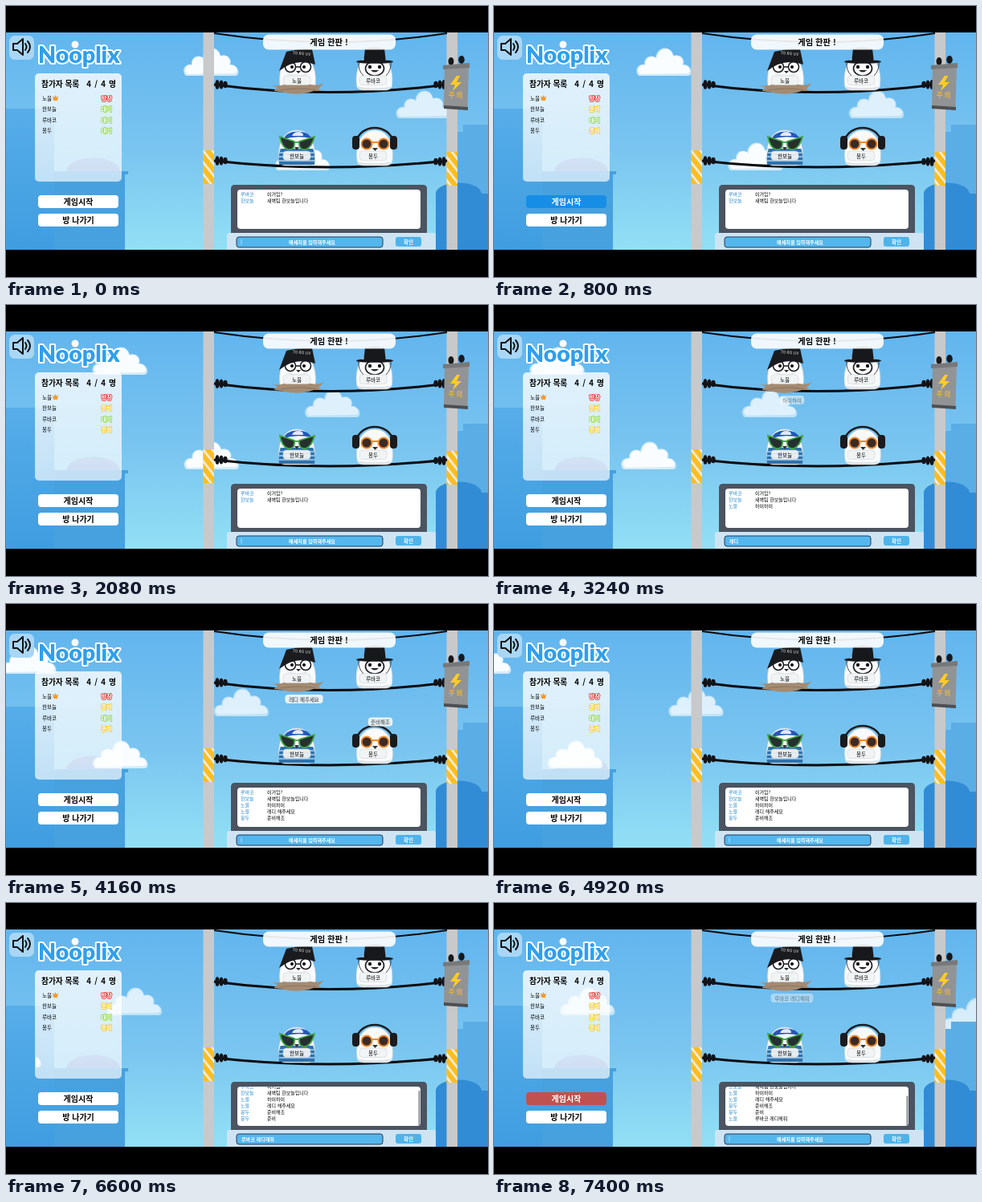
Write an HTML page that moves like this. It is 600 px wide and 338 px high and loops after 7440 ms.

```html
<!DOCTYPE html>
<html lang="ko">
<head>
<meta charset="utf-8">
<title>게임 대기실</title>
<style>
html, body { margin: 0; width: 100%; height: 100%; overflow: hidden; background: #000; }
svg { display: block; width: 100vw; height: 100vh; font-family: "Noto Sans CJK KR", "Noto Sans CJK", sans-serif; }
text { dominant-baseline: central; }
.mid { text-anchor: middle; }
.bold { font-weight: 700; }
.black { font-weight: 900; }
.logo { font: 900 28.5px Lato, sans-serif; fill: #2f9fec; stroke: #fff; stroke-width: 4; stroke-linejoin: round; paint-order: stroke; }
.status { font-size: 7.3px; font-weight: 700; fill: #fff; stroke-width: 1.5; stroke-linejoin: round; paint-order: stroke; }
.wire { fill: none; stroke: #0b0b0d; stroke-width: 3; }
.name { font-size: 6.5px; font-weight: 500; }
.chat { font-size: 6px; }
#clouds { animation: drift 7.44s linear infinite; }
@keyframes drift { to { transform: translateX(-405.5px); } }
</style>
</head>
<body>
<svg viewBox="0 0 600 338" preserveAspectRatio="none">
  <defs>
    <linearGradient id="sky" x2="0" y2="1">
      <stop offset="0" stop-color="#62b5ee"/>
      <stop offset=".55" stop-color="#7ac5f0"/>
      <stop offset="1" stop-color="#92e0f5"/>
    </linearGradient>
    <linearGradient id="tower" x2="0" y2="1">
      <stop offset="0" stop-color="#56ade9"/>
      <stop offset="1" stop-color="#3f9de0"/>
    </linearGradient>
    <linearGradient id="glass" x2="0" y2="1">
      <stop offset="0" stop-color="#fff" stop-opacity=".8"/>
      <stop offset="1" stop-color="#fff" stop-opacity=".66"/>
    </linearGradient>
    <pattern id="hazard" width="9" height="9" patternUnits="userSpaceOnUse" patternTransform="rotate(52)">
      <rect width="9" height="9" fill="#f1eee2"/>
      <rect width="9" height="6.3" fill="#fbbd22"/>
    </pattern>
    <clipPath id="view"><rect y="33" width="600" height="271"/></clipPath>
    <clipPath id="log"><rect x="288" y="229" width="228" height="49" rx="4"/></clipPath>
    <clipPath id="belly"><path d="M340 198C338 181 344 163 362 163S386 181 384 198Z"/></clipPath>
    <g id="cloud">
      <path fill="#d3ecfa" d="M-31 17C-38 10-31 1-24 3C-25-7-14-10-10-5C-9-20 9-22 12-8C20-11 27-4 24 3C34 2 38 17 30 17Z"/>
      <path fill="#f9fdff" d="M-29 15C-35 10-30 2-23 4C-24-6-14-9-9-4C-8-19 10-20 12-7C20-10 26-4 23 4C32 2 36 13 29 14Z"/>
    </g>
    <g id="body">
      <path fill="#f9fafb" stroke="#d4dade" stroke-width=".7" d="M-22 17C-24-2-17-20 0-20S24-2 22 17C22 23 17 24 12 24H-12C-17 24-22 23-22 17Z"/>
      <path fill="#dfe4e8" d="M-21 19C-16 22 16 22 21 19C20 23 16 24 12 24H-12C-16 24-20 23-21 19Z"/>
    </g>
    <g id="post">
      <rect y="33" width="13.5" height="271" fill="#c8c9cb"/>
    </g>
    <g id="knob" fill="#111318">
      <ellipse cx="0" rx="2.7" ry="6"/><ellipse cx="5" rx="2.7" ry="5.5"/><ellipse cx="10" rx="2.7" ry="4.3"/>
    </g>
  </defs>

  <g clip-path="url(#view)">
    <rect y="33" width="600" height="271" fill="url(#sky)"/>
    <rect x="37" y="128" width="23" height="176" fill="url(#tower)"/>
    <path d="M75 206C78 184 139 184 142 206Z" fill="#6f9fdc"/>
    <path d="M60 206H152V210H148V304H60Z" fill="#47a1df"/>
    <g id="clouds">
      <use href="#cloud" x="255" y="70"/>
      <use href="#cloud" x="369" y="188"/>
      <use href="#cloud" x="519.5" y="123" opacity=".8"/>
      <use href="#cloud" transform="translate(1003 140) scale(1.25)" opacity=".75"/>
    </g>
    <rect y="128" width="37" height="176" fill="url(#tower)"/>
    <path d="M562 304V157H569V148H600V304Z" fill="#5bade6"/>
    <path d="M535 304V234C537 216 590 216 592 234H600V304Z" fill="#318cd5"/>

    <use href="#post" x="245.5"/>
    <use href="#post" x="548.5"/>
    <rect x="245.5" y="180" width="13.5" height="42" fill="url(#hazard)"/>
    <rect x="548.5" y="182" width="13.5" height="42" fill="url(#hazard)"/>

    <path class="wire" d="M259 34Q404 56 549 34" style="stroke-width:2"/>
    <path class="wire" d="M259 98Q400 117 549 98"/>
    <path class="wire" d="M259 193Q400 209 549 193"/>
    <use href="#knob" x="263" y="98"/><use href="#knob" x="263" y="193"/>
    <use href="#knob" transform="translate(545 98) scale(-1 1)"/>
    <use href="#knob" transform="translate(545 194) scale(-1 1)"/>

    <g>
      <ellipse cx="554" cy="69" rx="3.5" ry="5" fill="#17181b"/>
      <ellipse cx="567" cy="67" rx="3.8" ry="5" fill="#17181b"/>
      <path d="M546 74L576 72L574.500 129L545 127Z" fill="#929394"/>
      <path d="M544 74L577 71V77L544 79Z" fill="#77787a"/>
      <path d="M545 124L575 126V130L545 128Z" fill="#4d4f52"/>
      <path d="M561 87L553 98H559L556 106L567 95H561L565 87Z" fill="#fdcb27"/>
      <text class="mid black" x="560.500" y="110" font-size="8.500" fill="#f3b52d" letter-spacing="2">주의</text>
    </g>

    <g id="bird1">
      <use href="#body" x="363" y="81"/>
      <path d="M350 84Q363 91 376 84" fill="none" stroke="#d9dfe3"/>
      <g fill="#fff" stroke="#17181b" stroke-width="1.5">
        <circle cx="354" cy="76" r="6.500"/><circle cx="373" cy="76" r="6.500"/><path d="M360.500 76H366.500"/>
      </g>
      <circle cx="356" cy="76" r="2"/><circle cx="371" cy="76" r="2"/>
      <path d="M361 81H367L364 84Z" fill="#242424"/>
      <path d="M340 81L349 57Q365 53 381 54L385 73Q361 64 340 81Z" fill="#1a1b1e"/>
      <text class="mid" x="368" y="58.500" font-size="5" fill="#e7e7e7" transform="rotate(5 368 58)">TO RO UV</text>
      <path d="M330 98Q337 101 346 98H380Q390 100 396 96L389 103L393 106L383 106Q363 113 342 107L333 106L338 102Z" fill="#a48b72"/>
      <path d="M341 105Q365 101 386 105" fill="none" stroke="#8d745e"/>
    </g>
    <g id="bird2">
      <use href="#body" x="458.500" y="81"/>
      <ellipse cx="459" cy="78" rx="11.500" ry="9" fill="#fff" stroke="#202226" stroke-width="1.700"/>
      <circle cx="453" cy="76" r="2.200" fill="#17181b"/><circle cx="465" cy="76" r="2.200" fill="#17181b"/>
      <path d="M454 80Q459 85 464 80Z" fill="#222"/>
      <path d="M447 53Q459 50 471 53L473 71H445Z" fill="#17181b"/>
      <ellipse cx="459" cy="69.500" rx="23" ry="2.300" fill="#17181b"/>
      <path d="M439 70Q438 80 445 87M479 70Q480 80 473 87" fill="none" stroke="#202226" stroke-width=".8"/>
    </g>
    <g id="bird3">
      <use href="#body" x="362" y="175"/>
      <g clip-path="url(#belly)">
        <rect x="338" y="178" width="48" height="21" fill="#2f72ae"/>
        <path d="M338 183H386M338 188H386M338 193H386" stroke="#a9d5ed" stroke-width="1.700"/>
      </g>
      <path d="M346 166C348 154 376 153 380 165Q362 161 346 166Z" fill="#2358b8"/>
      <path d="M356 162Q358 157 364 157T370 162Z" fill="#dfe9f6"/>
      <g fill="#263030" stroke="#42a447" stroke-width="1.800">
        <path d="M341 163L359 169Q360 180 351 179Q343 176 341 163Z"/>
        <path d="M384 163L365 169Q364 180 373 179Q381 176 384 163Z"/>
        <path d="M359 170H365"/>
      </g>
      <path d="M359 176H365L362 180Z" fill="#333"/>
    </g>
    <g id="bird4">
      <use href="#body" x="459" y="175"/>
      <path d="M436 170C440 146 478 146 482 170" fill="none" stroke="#1a1b1e" stroke-width="2.500"/>
      <rect x="431" y="162" width="9" height="17" rx="4" fill="#1a1b1e"/>
      <rect x="478" y="162" width="9" height="17" rx="4" fill="#1a1b1e"/>
      <g fill="#3c2a24" stroke="#f08a2d" stroke-width="2">
        <circle cx="449" cy="172" r="6.500"/><circle cx="470" cy="172" r="6.500"/><path d="M455.500 170H463.500"/>
      </g>
      <path d="M456 177H463L459.500 181Z" fill="#333"/>
    </g>
    <g id="tags"></g>
    <g id="bubbles"></g>

    <rect x="320" y="35.500" width="165" height="19" rx="7" fill="#fff" fill-opacity=".9"/>
    <text class="mid black" x="402" y="44.500" font-size="10.300">게임 한판 !</text>

    <rect x="4" y="37" width="31" height="30" rx="7" fill="#a9d6f5"/>
    <path d="M9 47H14L21 41V61L14 55H9Z" fill="none" stroke="#111" stroke-width="2" stroke-linejoin="round"/>
    <path d="M24 47Q27 51 24 55M27 44Q33 51 27 58" fill="none" stroke="#111" stroke-width="2" stroke-linecap="round"/>

    <text class="logo" x="40" y="60">Nooplix</text>
    <circle cx="86" cy="48" r="4.500" fill="#f7fbfe"/>

    <rect x="36" y="84" width="108" height="135" rx="5" fill="url(#glass)"/>
    <text class="black" x="44" y="96.500" font-size="9.700">참가자 목록</text>
    <text class="black" x="137" y="96.500" font-size="9.700" word-spacing="1.500" text-anchor="end">4 / 4 명</text>
    <g id="players"></g>
    <path d="M58 112L60 114L61.500 111L63 114L65 112L64 118H59Z" fill="#f39b2d"/>

    <rect id="start" x="40" y="236" width="100" height="16" rx="4"/>
    <text id="startText" class="mid black" x="90" y="243.500" font-size="10">게임시작</text>
    <rect x="40" y="259" width="100" height="16" rx="4" fill="#fff"/>
    <text class="mid black" x="90" y="266.500" font-size="10">방 나가기</text>

    <path d="M280 284V228Q280 223 285 223H519Q524 223 524 228V284Z" fill="#4b5460"/>
    <rect x="288" y="229" width="228" height="49" rx="4" fill="#fff"/>
    <path d="M275 304V286Q275 283 278 283H532Q535 283 535 286V304Z" fill="#cfe4f2"/>
    <g clip-path="url(#log)">
      <g id="messages"></g>
      <rect id="thumb" x="513.500" width="1.800" rx=".9" fill="#83888e"/>
    </g>
    <rect x="287" y="288" width="182" height="13" rx="3" fill="#53b7ee" stroke="#213a5b"/>
    <text id="hint" class="mid bold" x="381" y="294" font-size="6.100" fill="#fff">메세지를 입력해주세요</text>
    <text id="typed" class="bold" x="293" y="294" font-size="6.100" fill="#fff"></text>
    <path id="caret" d="M293 291V297.500" stroke="#d8f0ff" stroke-width=".7"/>
    <rect x="485" y="288" width="32" height="12" rx="3" fill="#4fb3ea"/>
    <text class="mid bold" x="501" y="293.500" font-size="6.500" fill="#fff">확인</text>
  </g>
</svg>
<script>
const LOOP = 7440, NEVER = Infinity;
const ROW_TOP = 234.5, ROW_STEP = 8.1, ROW_LAST = 268.6;
const BUBBLE_LIFE = 900, BUBBLE_FADE = 360;
const $ = id => document.getElementById(id);

function add(parent, tag, attrs, text = '') {
  const el = document.createElementNS('http://www.w3.org/2000/svg', tag);
  for (const key in attrs) el.setAttribute(key, attrs[key]);
  el.textContent = text;
  parent.append(el);
  return el;
}

const players = [
  { name: '노을', x: 362, y: 92.5, ready: NEVER },
  { name: '한보늘', x: 362, y: 186.5, ready: 360 },
  { name: '루바코', x: 457, y: 92.5, ready: 7000 },
  { name: '몽두', x: 457, y: 186.5, ready: 640 }
];
const messages = [
  { who: 2, text: '이거임?', at: -1 },
  { who: 1, text: '새벽팀 한보늘입니다', at: -1 },
  { who: 0, text: '하이하이', at: 2560 },
  { who: 0, text: '레디 해주세요', at: 3680 },
  { who: 3, text: '준비해조', at: 3920 },
  { who: 3, text: '준비', at: 4960 },
  { who: 0, text: '루바코 레디해줘', at: 6680 }
];
const drafts = [
  { from: 2200, step: 60, words: ['ㅎ', '하', '하이', '하잏', '하이하', '하이하이'], end: 2560 },
  { from: 3000, step: 70, words: ['ㄹ', '레', '렏', '레디', '레디 ', '레디 해', '레디 해주', '레디 해주세', '레디 해주세요'], end: 3680 },
  { from: 5480, step: 90, words: ['ㄹ', '루', '루밬', '루바코', '루바코 ', '루바코 레', '루바코 레디', '루바코 레디해', '루바코 레디해줘'], end: 6680 }
];

players.forEach((p, i) => {
  add($('tags'), 'rect', { x: p.x - 17, y: p.y - 5.5, width: 34, height: 11.5, rx: 4, fill: '#f1f3f5', 'fill-opacity': .92, stroke: '#c8ced3', 'stroke-width': .5 });
  add($('tags'), 'text', { class: 'mid name', x: p.x, y: p.y }, p.name);
  const y = 115 + i * 13.3;
  add($('players'), 'text', { class: 'name', x: 45, y }, p.name);
  p.label = add($('players'), 'text', { class: 'status', x: 118.5, y });
});

messages.forEach((m, i) => {
  m.row = add($('messages'), 'g', { class: 'chat' });
  const y = ROW_TOP + i * ROW_STEP;
  add(m.row, 'text', { x: 292, y, fill: '#2788cc' }, players[m.who].name);
  add(m.row, 'text', { x: 325, y }, m.text);
  if (m.at < 0) return;
  const [x, by] = m.who ? [466, 147] : [371, 118.5];
  const w = m.text.length * 5.6 + 8;
  m.bubble = add($('bubbles'), 'g', {});
  add(m.bubble, 'rect', { x: x - w / 2, y: by - 5.5, width: w, height: 11, rx: 4, fill: '#f1f6f9', 'fill-opacity': .92 });
  add(m.bubble, 'text', { class: 'mid', x, y: by, 'font-size': 6.5, fill: '#333' }, m.text);
});

function setStatus(p, i, t) {
  const [text, color] = i === 0 ? ['방장', '#e83434'] : t >= p.ready ? ['준비', '#f2c832'] : ['대기', '#85d932'];
  p.label.textContent = text;
  p.label.setAttribute('stroke', color);
}

function render(t) {
  players.forEach((p, i) => setStatus(p, i, t));

  let count = 0;
  for (const m of messages) {
    const age = t - m.at;
    m.row.style.display = age >= 0 ? '' : 'none';
    if (age >= 0) count++;
    if (m.bubble) m.bubble.style.opacity = age < 0 ? 0 : Math.min(1, age / 80, Math.max(0, (BUBBLE_LIFE - age) / BUBBLE_FADE));
  }
  const scroll = Math.max(0, ROW_TOP + (count - 1) * ROW_STEP - ROW_LAST);
  $('messages').setAttribute('transform', `translate(0 ${-scroll})`);
  $('thumb').setAttribute('y', 229 + scroll * .8);
  $('thumb').setAttribute('height', scroll ? 49 - scroll * .8 : 0);

  const draft = drafts.find(d => t >= d.from && t < d.end);
  const word = draft ? draft.words[Math.min(draft.words.length - 1, Math.floor((t - draft.from) / draft.step))] : '';
  $('typed').textContent = word;
  $('hint').style.display = word ? 'none' : '';
  const focused = t < 360 || t >= 1960;
  $('caret').style.display = focused && !word && t % 520 < 400 ? '' : 'none';

  const fill = t >= 7120 ? '#bf524e' : t >= 720 && t < 1160 ? '#178ee6' : '#fff';
  $('start').setAttribute('fill', fill);
  $('startText').setAttribute('fill', fill === '#fff' ? '#000' : '#fff');
}

let origin;
function tick(now) {
  origin ??= now;
  render((now - origin) % LOOP);
  requestAnimationFrame(tick);
}
render(0);
requestAnimationFrame(tick);
</script>
</body>
</html>
```
